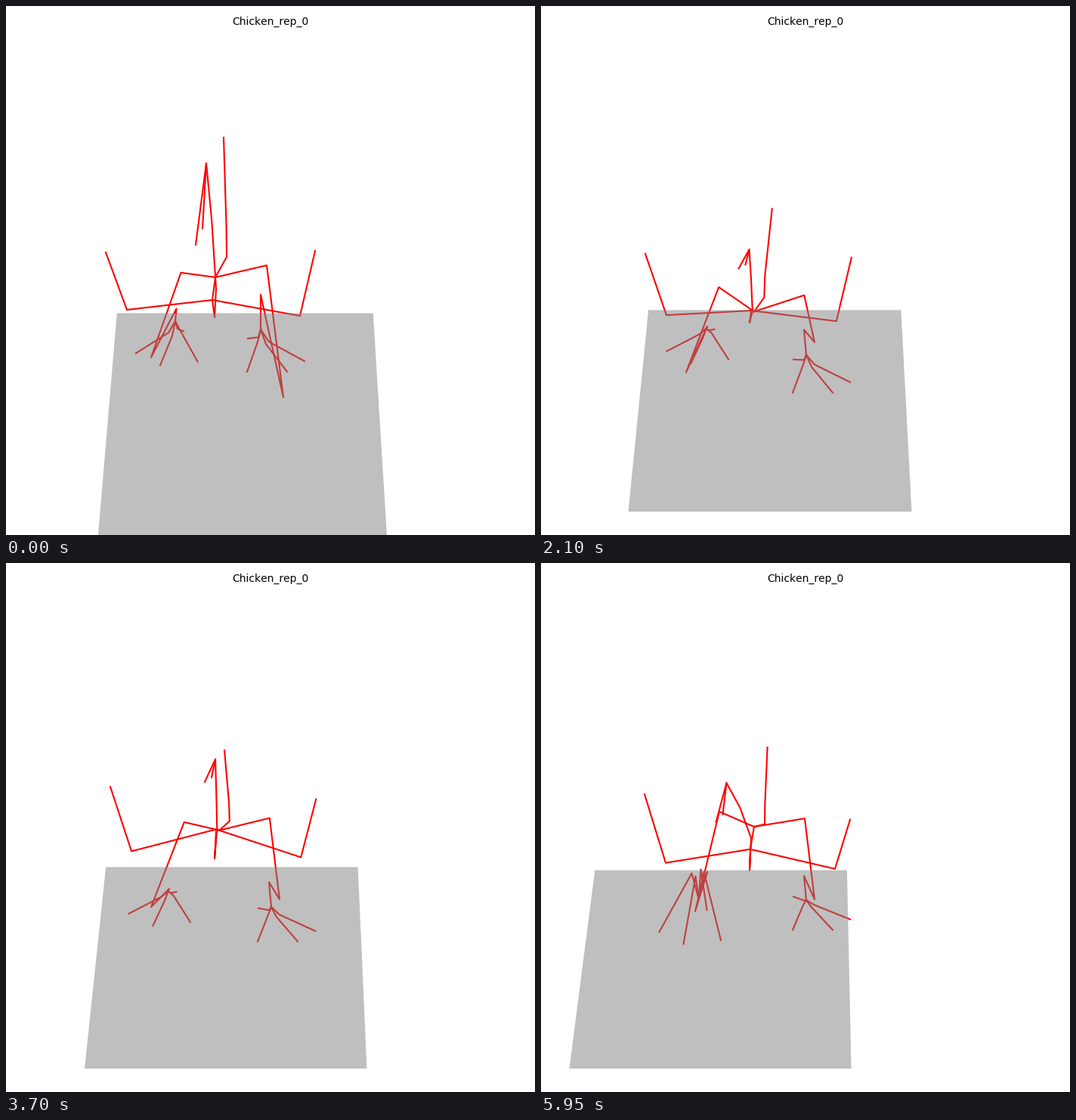
These frames come from a looping animation (700x700 px, 6 s). A matplotlib script:

```python
import numpy as np
import matplotlib.pyplot as plt
from matplotlib.animation import FuncAnimation
from matplotlib.patches import Polygon

SIZE, DPI = 700, 100
FRAMES, STEP = 120, 50
t = np.arange(FRAMES) * STEP / 1000  # seconds
POSES = (0, 0.9, 2.1, 2.7, 3.7, 4.5, 5.95)


def curve(values, times=POSES):
    """Cubic Hermite curve through key values, flat at turning points."""
    k, v = np.array(times, float), np.array(values, float)
    rate = np.diff(v) / np.diff(k)
    slope = np.gradient(v, k)
    slope[1:-1][rate[:-1] * rate[1:] <= 0] = 0
    i = np.clip(np.searchsorted(k, t, side="right") - 1, 0, len(k) - 2)
    h = k[i + 1] - k[i]
    u = (t - k[i]) / h
    return ((1 + 2 * u) * (1 - u) ** 2 * v[i] + u * (1 - u) ** 2 * h * slope[i]
            + u * u * (3 - 2 * u) * v[i + 1] - u * u * (1 - u) * h * slope[i + 1])


def ease(start, end):
    u = np.clip((t - start) / (end - start), 0, 1)
    return u * u * (3 - 2 * u)


def pulse(center, width):
    return np.exp(-((t - center) / width) ** 2)


def wave(period, start=0):
    return np.cos(2 * np.pi * (t - start) / period)


def pt(x, y):
    return np.column_stack([x + 0 * t, y + 0 * t])


def lerp(a, b, fx, fy):
    return a + (b - a) * np.array([fx, fy])


# shared motion
settle = np.exp(-t / 1.2)            # stance drifting into place
sway = 7 * pulse(2.85, 0.65)         # sideways lean during the jump
hop = 35 * sum(pulse(c, 0.25) for c in (1.6, 3.15, 4.9))
plant = 1 - ease(1, 2)               # right leg stretched forward
swing = ease(5.35, 5.95)             # left foot coming off the ground

# trunk
hip_y = curve([359, 369, 405, 364, 354, 367, 349]) - hop
chest_y = hip_y + 11 + 19 * wave(5.8)
droop = curve([17, 22, 10, 5.5, 33, 14, 22])
hip = pt(282 - 5 * settle + sway / 2, hip_y)
chest = pt(277 - 4 * settle + sway, chest_y)
keel = pt(276, chest_y + droop + 6)

# tail
tail = pt(296 - 4 * settle, hip_y - 27 + 4 * t)
tail_tip = pt(298 - 10 * wave(3.45), curve([174, 281, 269, 237, 248, 261, 244]) - hop)
tail_path = [hip, tail, lerp(tail, tail_tip, 0.1, 0.25),
             lerp(tail, tail_tip, 0.4, 0.5), tail_tip]

# neck and beak
head = pt(curve([265, 260, 275.5, 291, 277, 273.5, 245.5]),
          curve([208, 401, 323, 341, 260, 283.5, 291]) - hop)
gape = curve([108, 67, 25, 76, 30, 95.5, 52])
neck = pt(278 + sway, (hip_y + chest_y) / 2)
beak = [head + pt(-14, gape), head + pt(-5, 0.8 * gape)]
neck_path = [hip, chest, keel, neck, lerp(neck, head, 0.45, 0.55), head, beak[0]]

# wings
l_wing = pt(165 - 5 * settle + sway, chest_y + droop - 4)
r_wing = pt(389 + sway, chest_y + droop + 4)
wing_path = [l_wing + pt(-28, -76 - 2.5 * t), l_wing, chest, r_wing,
             r_wing + pt(20, 3.5 * t - 86 - 3 * sway)]

# legs
pelvis_y = curve([348, 373, 378, 337, 340.5, 355, 333.5]) - hop
roll = 6 * wave(4, 0.4)
l_hip = pt(236 - 4.5 * settle, pelvis_y + roll)
r_hip = pt(349 - 4 * settle, pelvis_y - roll)
l_tilt = 1.6 * (t - 2.9) ** 2 - 3
r_tilt = 9 - 2.8 * t
l_foot = pt(224 - 2.6 * t, 417 + 4.6 * t)
r_foot = pt(351 - 14 * plant, 470 - 4 * t - 42 * plant)
l_knee = pt(192 + 12 * swing, pelvis_y + hop + roll + 112 + 20 * swing)
r_knee = pt(362 + 5 * plant, 445 + 73 * plant)
l_heel = l_foot + pt(1.5 + 10 * swing, -5 - 1.1 * l_tilt - 18 * swing)
r_heel = pt(r_foot[:, 0] - 3 + 3 * plant, 436 - 3.7 * t - 54 * settle * plant)


def toes(foot, tilt, lift, knuckles, tips):
    return [[foot, foot + pt(kx, ky + 0.6 * tilt - lift), foot + pt(x, y + tilt)]
            for (kx, ky), (x, y) in zip(knuckles, tips)]


chains = [tail_path, neck_path, [head, beak[1]], wing_path,
          [hip, l_hip, l_knee, l_heel, l_foot],
          [hip, r_hip, r_knee, r_heel, r_foot],
          *toes(l_foot, l_tilt, 50 * swing,
                [(3, 4), (-9, 9), (-4, 13), (7, 7)],
                [(11, 3), (-52, 32), (-20, 48), (29.5, 43)]),
          *toes(r_foot, r_tilt, 0,
                [(-3, 5), (-4, 11), (7, 14), (11, 11)],
                [(-17, 3), (-18, 47), (35, 47), (58, 33)])]
paths = [np.stack(c, axis=1) for c in chains]

# floor seen in perspective, drifting left
near_x = curve([120.5, 118.5, 115.5, 110.5, 104, 66.5, 43.5, 37.5],
               (0, 1.3, 2.1, 2.7, 3.7, 4.5, 5.2, 5.95))
near_y = 669 + 48 * pulse(0, 0.85)
near_w = 373 + 11.5 * settle
far_x = near_x + 26.3 + 0.036 * t ** 3
far_y = 404 + 2.5 * wave(5.8)
far_w = 333.5 + 5.5 * pulse(0, 1.5)
floor_path = np.stack([pt(far_x, far_y), pt(far_x + far_w, far_y),
                       pt(near_x + near_w, near_y), pt(near_x, near_y)], axis=1)

plt.rcParams["text.kerning_factor"] = 6
fig = plt.figure(figsize=(SIZE / DPI, SIZE / DPI), dpi=DPI, facecolor="white")
ax = fig.add_axes([0, 0, 1, 1])
ax.set(xlim=(0, SIZE), ylim=(SIZE, 0))
ax.axis("off")
ax.text(350, 25, "Chicken_rep_0", fontsize=10, family="DejaVu Sans",
        ha="center", va="baseline", color="black")
bones = [ax.plot([], [], color="red", lw=1.5, zorder=2)[0] for _ in paths]
floor = ax.add_patch(Polygon(floor_path[0], closed=True, facecolor="gray",
                             edgecolor="none", alpha=0.5, zorder=3))


def draw(k):
    for bone, path in zip(bones, paths):
        bone.set_data(path[k, :, 0], path[k, :, 1])
    floor.set_xy(floor_path[k])
    return [*bones, floor]


anim = FuncAnimation(fig, draw, frames=FRAMES, interval=STEP, repeat=True, repeat_delay=0)
plt.show()
```
